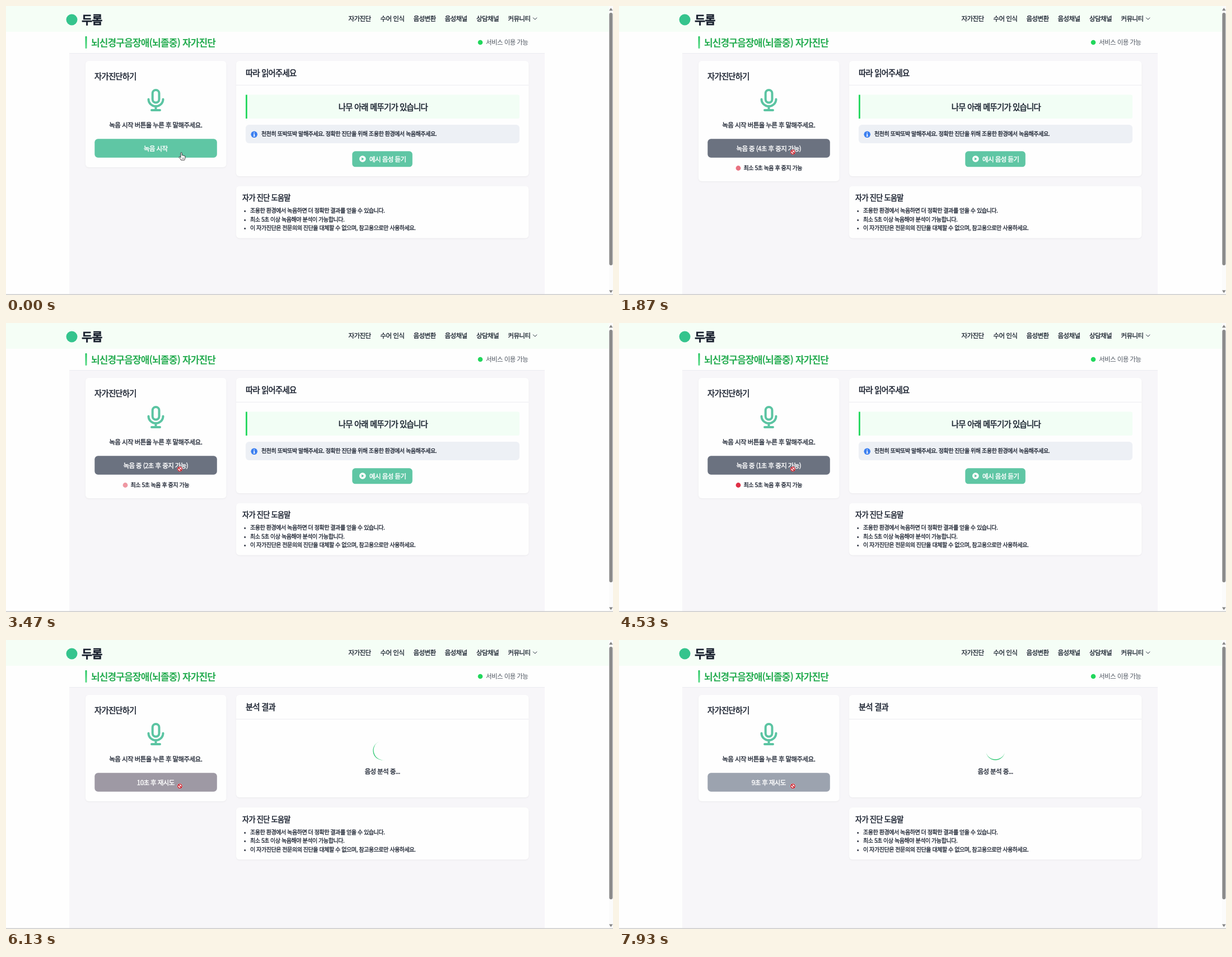
An HTML page for the animation above (8 s loop, 1084 px wide and 516 px high).

```html
<!DOCTYPE html>
<html lang="ko">
<head>
<meta charset="utf-8">
<title>자가진단</title>
<style>
html, body { margin: 0; width: 100%; height: 100%; overflow: hidden; background: #fefefe; }
svg { display: block; width: 1084px; height: 516px; }
text {
  font: 500 11.5px "Noto Sans CJK KR", "Noto Sans CJK", sans-serif;
  letter-spacing: -.05em; white-space: pre;
  fill: #1b2230; stroke: #1b2230; stroke-width: .3;
}
.mid { text-anchor: middle; }
.head { font-size: 14.3px; stroke-width: .5; }
.small { font-size: 10.1px; }
.title { font-size: 17px; font-weight: 700; fill: #27ad52; stroke: none; }
.logo { font-size: 21px; font-weight: 700; }
.soft { fill: #4f5661; stroke: none; }
.onDark { fill: #fff; stroke: #fff; stroke-width: .4; }
.card { fill: #fefefe; filter: drop-shadow(0 1px 1px rgba(0, 0, 0, .05)); }
.line { stroke: #ebecf0; }
.mic { fill: none; stroke: #5bc4a2; stroke-width: 4; stroke-linecap: round; }
</style>
</head>
<body>
<svg viewBox="0 0 1084 516">
  <defs>
    <linearGradient id="fade" x2="0" y2="1">
      <stop stop-color="#22c55e"/><stop offset="1" stop-color="#5fdc8b"/>
    </linearGradient>
  </defs>

  <!-- page -->
  <rect width="1084" height="516" fill="#fefefe"/>
  <rect x="113" y="84" width="849" height="431" fill="#f7f6f9"/>
  <path class="line" d="M113 84.5H962"/>
  <rect width="1077" height="46" fill="#f5fef6"/>

  <!-- header -->
  <circle cx="117.5" cy="24.5" r="10" fill="#35c48d"/>
  <text class="logo" x="135" y="31.8">두롬</text>
  <g id="nav"></g>
  <path d="M941.2 20.700l3.500 3.500 3.500-3.500" fill="none" stroke="#1f2937"/>
  <rect x="141.5" y="54" width="3" height="22" rx="1" fill="url(#fade)"/>
  <text class="title" x="152" y="71.6">뇌신경구음장애(뇌졸중) 자가진단</text>
  <circle cx="847" cy="65" r="4.3" fill="#22d75c"/>
  <text class="soft" x="857" y="69.1">서비스 이용 가능</text>

  <!-- recorder -->
  <rect id="recCard" class="card" x="142" y="98" width="251.5" height="190" rx="6"/>
  <text class="head" x="158" y="131.1">자가진단하기</text>
  <g class="mic">
    <rect x="261.7" y="150" width="11.8" height="22.5" rx="5.9"/>
    <path d="M254.5 166.5a13 12.5 0 0 0 26 0M267.5 179.5v6.5M260 186h15"/>
  </g>
  <text class="mid" x="267.3" y="216.6">녹음 시작 버튼을 누른 후 말해주세요.</text>
  <rect id="btn" x="158.3" y="237.2" width="218.5" height="33.6" rx="6"/>
  <text id="btnText" class="mid onDark" x="267.3" y="258.7"></text>
  <g id="status">
    <circle id="dot" cy="289.5" r="4.4" fill="#df2f45"/>
    <text id="statusText" class="small" y="293.3"></text>
  </g>

  <!-- sentence to read -->
  <g id="reading">
    <rect class="card" x="411" y="98" width="522.5" height="206" rx="6"/>
    <text class="head" x="428" y="125.2">따라 읽어주세요</text>
    <rect x="428" y="158.5" width="489" height="42.5" rx="3" fill="#f2fef5"/>
    <rect x="428" y="158.5" width="2.8" height="42.5" fill="#22d75c"/>
    <text class="head mid" x="673.3" y="185.6">나무 아래 메뚜기가 있습니다</text>
    <rect x="428" y="212" width="489" height="33" rx="6" fill="#edf0f5"/>
    <circle cx="443.2" cy="229.3" r="5.8" fill="#3b7ff0"/>
    <path d="M443.2 225.5v1.6M442 228.6h1.3v3.6M441.7 232.3h3" fill="none" stroke="#fff" stroke-width="1.4"/>
    <text class="small" x="456" y="231.8">천천히 또박또박 말해주세요. 정확한 진단을 위해 조용한 환경에서 녹음해주세요.</text>
    <rect x="618.3" y="259.3" width="107.5" height="28" rx="5.5" fill="#5fc6a4"/>
    <circle cx="636.8" cy="273" r="5.8" fill="#fff"/>
    <path d="M635 270.2v5.6l4.6-2.8z" fill="#5fc6a4"/>
    <text class="onDark" x="649" y="277.7">예시 음성 듣기</text>
  </g>

  <!-- analysis -->
  <g id="analysis">
    <rect class="card" x="411" y="98" width="522.5" height="183" rx="6"/>
    <text class="head" x="428" y="125.2">분석 결과</text>
    <path id="spinner" d="M-17 0A17 17 0 0 0 17 0A17 15.6 0 0 1-17 0" fill="#2fc873"/>
    <text class="mid" x="672" y="239.2">음성 분석 중...</text>
  </g>
  <path class="line" d="M411 141.3H933.5"/>

  <!-- help -->
  <g id="help">
    <rect class="card" x="411" y="321.5" width="522.5" height="93" rx="6"/>
    <text class="head" x="422" y="347.4" style="font-size:13.1px">자가 진단 도움말</text>
    <g id="tips"></g>
  </g>

  <!-- scrollbar -->
  <rect x="1076.5" width="7.5" height="516" fill="#fbfbfb"/>
  <rect x="1077.3" y="12" width="6" height="451" rx="3" fill="#8b8b8b"/>
  <path d="M1077 8.2h6.6l-3.3-5zM1077 507.5h6.6l-3.3 5z" fill="#858585"/>
  <rect y="514.5" width="1084" height="1.5" fill="#cbcbcb"/>

  <!-- cursors -->
  <g id="hand">
    <path d="M-1.3.9C-1.3-.6 1-.6 1 .9V5c.6-.8 2-.5 2.1.4 .7-.5 1.8-.2 1.9.6 .8-.4 1.7 0 1.7 1V9.8c0 1.7-1.2 2.4-1.200 3.500H-.8c-.3-1.500-2-2.900-3.300-4.600-.6-1.100.7-1.800 1.500-1l1.300 1.200z"
      fill="#fff" stroke="#222" stroke-width=".9" stroke-linejoin="round"/>
    <path d="M1.3 9v2.4M2.900 9v2.4M4.400 9v2.4" stroke="#444" stroke-width=".6"/>
  </g>
  <g id="blocked" transform="translate(310.5 260.8)" fill="none" stroke-width="1.5">
    <circle r="4.2" fill="#fff" stroke="#fff" stroke-width="1"/>
    <circle r="3.6" stroke="#c4121f"/>
    <path d="M-2.5-2.5l5 5" stroke="#c4121f"/>
  </g>
</svg>
<script>
const LOOP = 8000, START = 460, STOP_READY = 5460, ANALYSE = 5930, FADE = 300;
const GREEN = [95, 198, 164], SLATE = [107, 114, 128], RED = [185, 28, 28], GRAY = [156, 163, 175];
const $ = id => document.getElementById(id);

function addText(parent, x, y, text, cls = '') {
  const el = document.createElementNS('http://www.w3.org/2000/svg', 'text');
  el.setAttribute('x', x);
  el.setAttribute('y', y);
  el.setAttribute('class', cls);
  el.textContent = text;
  parent.append(el);
}

[[611.5, '자가진단'], [668.5, '수어 인식'], [727.5, '음성변환'],
 [783.5, '음성채널'], [840, '상담채널'], [896.5, '커뮤니티']]
  .forEach(([x, label]) => addText($('nav'), x, 27.1, label));

['조용한 환경에서 녹음하면 더 정확한 결과를 얻을 수 있습니다.',
 '최소 5초 이상 녹음해야 분석이 가능합니다.',
 '이 자가진단은 전문의의 진단을 대체할 수 없으며, 참고용으로만 사용하세요.']
  .forEach((tip, i) => {
    const y = 369.3 + i * 15.5;
    addText($('tips'), 436, y, tip, 'small');
    addText($('tips'), 425, y, '•', 'small');
  });

function bezier(x1, y1, x2, y2) {
  const at = (a, b, s) => 3 * (1 - s) ** 2 * s * a + 3 * (1 - s) * s * s * b + s ** 3;
  return x => {
    if (x <= 0 || x >= 1) return x <= 0 ? 0 : 1;
    let lo = 0, hi = 1;
    for (let i = 0; i < 24; i++) {
      const s = (lo + hi) / 2;
      if (at(x1, x2, s) < x) lo = s; else hi = s;
    }
    return at(y1, y2, lo);
  };
}
const ease = bezier(.25, .1, .25, 1), pulse = bezier(.4, 0, .6, 1);

const mix = (a, b, k) => `rgb(${a.map((v, i) => Math.round(v + (b[i] - v) * k))})`;
const show = (id, on) => $(id).setAttribute('visibility', on ? 'visible' : 'hidden');
function setText(id, text) {
  if ($(id).textContent !== text) $(id).textContent = text;
}

// from, button label, colour before, colour after
const stages = [
  [0, () => '녹음 시작', GREEN, GREEN],
  [START, t => `녹음 중 (${5 - Math.floor((t - START) / 1000)}초 후 중지 가능)`, GREEN, SLATE],
  [STOP_READY, () => '녹음 중지', SLATE, RED],
  [ANALYSE, t => `${t < ANALYSE + 1010 ? 10 : 9}초 후 재시도`, RED, GRAY],
];

function render(t) {
  const [from, label, before, after] = stages.findLast(s => t >= s[0]);
  const recording = t >= START && t < ANALYSE;
  const ready = from === STOP_READY, analysing = t >= ANALYSE;

  setText('btnText', label(t));
  $('btn').setAttribute('fill', mix(before, after, ease((t - from) / FADE)));

  $('recCard').setAttribute('height', recording ? 215 : 190);
  show('status', recording);
  setText('statusText', ready ? '녹음 중 (5초)' : '최소 5초 녹음 후 중지 가능');
  $('statusText').setAttribute('x', ready ? 248.5 : 222.5);
  $('dot').setAttribute('cx', ready ? 239 : 213);
  const beat = (((t - START) / 1000) % 2 + 2) % 2;
  $('dot').setAttribute('opacity', beat < 1 ? 1 - pulse(beat) / 2 : .5 + pulse(beat - 1) / 2);

  show('reading', !analysing);
  show('analysis', analysing);
  $('help').setAttribute('transform', `translate(0 ${analysing ? -22.6 : 0})`);
  $('spinner').setAttribute('transform', `translate(672.3 197.5) rotate(${(t - ANALYSE) * .36})`);

  const isHand = t < START || ready;
  show('hand', isHand);
  show('blocked', !isHand);
  const k = Math.min(1, Math.max(0, (t - 70) / 200));
  $('hand').setAttribute('transform', `translate(${313.3 - 2.6 * k} ${261.8 - k})`);
}

function tick() {
  render(performance.now() % LOOP);
  requestAnimationFrame(tick);
}
tick();
</script>
</body>
</html>
```
